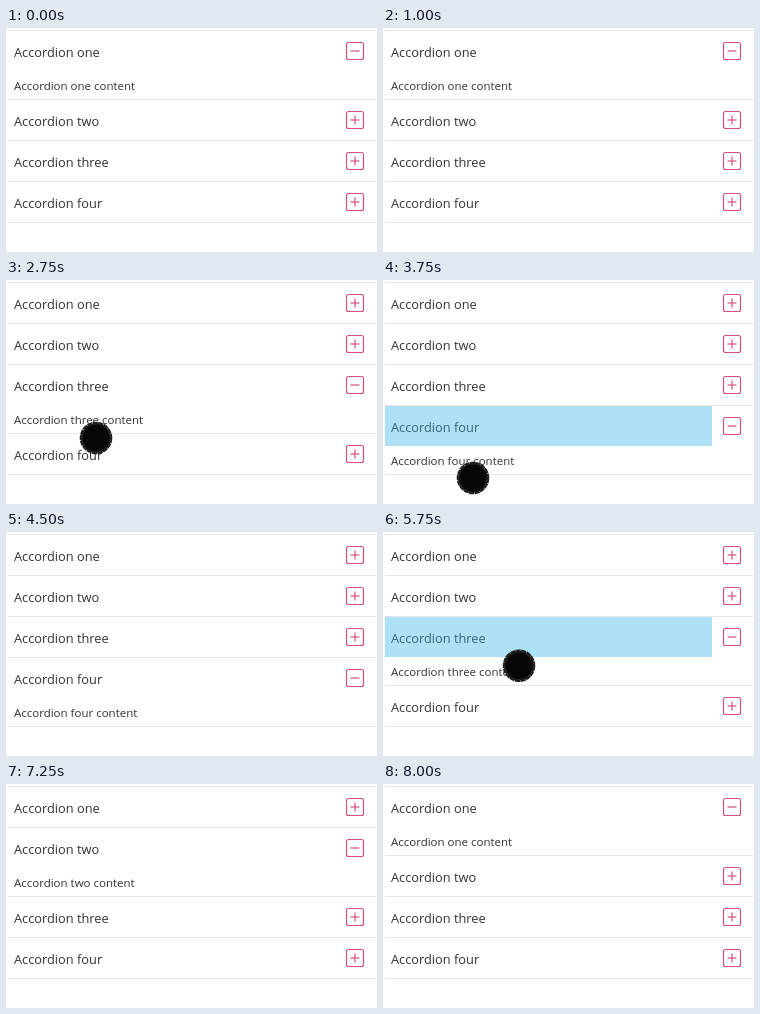
These frames come from a looping animation (371x224 px, 9.25 s). An HTML page:

```html
<!DOCTYPE html>
<html lang="en">
<head>
<meta charset="utf-8">
<title>Accordion</title>
<style>
  html, body { margin: 0; width: 100%; height: 100%; overflow: hidden; background: #fefefe; }
  svg { display: block; }
  text { font-family: "Open Sans", "Noto Sans", sans-serif; fill: #333; }
  .title { font-size: 12.8px; }
  .content { font-size: 11.5px; }
  .line { fill: #e6e6e6; }
  .button { fill: none; stroke: #d4507e; stroke-width: 1.2; }
  .tap { fill: rgba(51, 181, 229, .4); }
  .touch { fill: #070707; stroke: #202020; stroke-width: 3; stroke-dasharray: 5 .5; }
</style>
</head>
<body>
<svg id="stage" width="371" height="224" viewBox="0 0 371 224"></svg>
<script>
const stage = document.getElementById('stage');
const LOOP = 9250, STEP = 250, ROW = 41, EXTRA = 28;

const taps = [
  { time: 500, row: 0 }, { time: 1500, row: 1 }, { time: 2500, row: 2 }, { time: 3750, row: 3 },
  { time: 5750, row: 2 }, { time: 6750, row: 1 }, { time: 7500, row: 0 }
];

// The touch point glides along each sweep and is hidden between them.
const sweeps = [
  { start: 250, end: 1000, from: [100, 40], to: [95, 28] },
  { start: 1250, end: 4250, from: [90, 98], to: [90, 218] },
  { start: 5250, end: 7250, from: [140, 173], to: [124, 16] },
  { start: 7500, end: 8000, from: [124, 30], to: [124, 182] }
];

function add(parent, tag, attributes, text) {
  const node = document.createElementNS('http://www.w3.org/2000/svg', tag);
  for (const name in attributes) node.setAttribute(name, attributes[name]);
  if (text) node.textContent = text;
  return parent.appendChild(node);
}

const place = (node, x, y) => node.setAttribute('transform', `translate(${x} ${y})`);
const show = (node, visible) => node.setAttribute('visibility', visible ? 'visible' : 'hidden');
const mix = (a, b, k) => a + (b - a) * k;

const rows = ['one', 'two', 'three', 'four'].map(name => {
  const group = add(stage, 'g', {});
  add(group, 'rect', { class: 'line', x: 2, width: 368, height: 1 });
  add(group, 'text', { class: 'title', x: 8, y: 27 }, `Accordion ${name}`);
  const content = add(group, 'text', { class: 'content', x: 8, y: 60 }, `Accordion ${name} content`);
  const button = add(group, 'g', { class: 'button', transform: 'translate(349 21)' });
  add(button, 'rect', { x: -8.5, y: -8.5, width: 17, height: 17, rx: 2 });
  add(button, 'path', { d: 'M-4.5 0H4.5' });
  const plus = add(button, 'path', { d: 'M0 -4.5V4.5' });
  return { group, content, plus };
});
add(stage, 'rect', { class: 'line', x: 2, y: 194, width: 368, height: 1 });
const tapBox = add(stage, 'rect', { class: 'tap', x: 2, y: 1, width: 327, height: 40 });
const touch = add(stage, 'circle', { class: 'touch', r: 14.8 });

function draw(time) {
  const lastTap = taps.filter(tap => tap.time <= time).pop();
  const open = lastTap ? lastTap.row : 0;
  const rowTop = i => 2 + i * ROW + (i > open ? EXTRA : 0);

  rows.forEach(({ group, content, plus }, i) => {
    place(group, 0, rowTop(i));
    show(content, i === open);
    show(plus, i !== open);
  });

  show(tapBox, lastTap && time < lastTap.time + STEP);
  place(tapBox, 0, rowTop(open));

  const sweep = sweeps.find(({ start, end }) => time >= start && time < end);
  show(touch, sweep);
  if (sweep) {
    const k = (time - sweep.start) / (sweep.end - sweep.start);
    place(touch, ...sweep.from.map((value, axis) => mix(value, sweep.to[axis], k)));
  }
}

const begin = performance.now();
function tick() {
  const time = (performance.now() - begin) % LOOP;
  draw(Math.floor(time / STEP) * STEP);
  requestAnimationFrame(tick);
}
tick();
</script>
</body>
</html>
```
